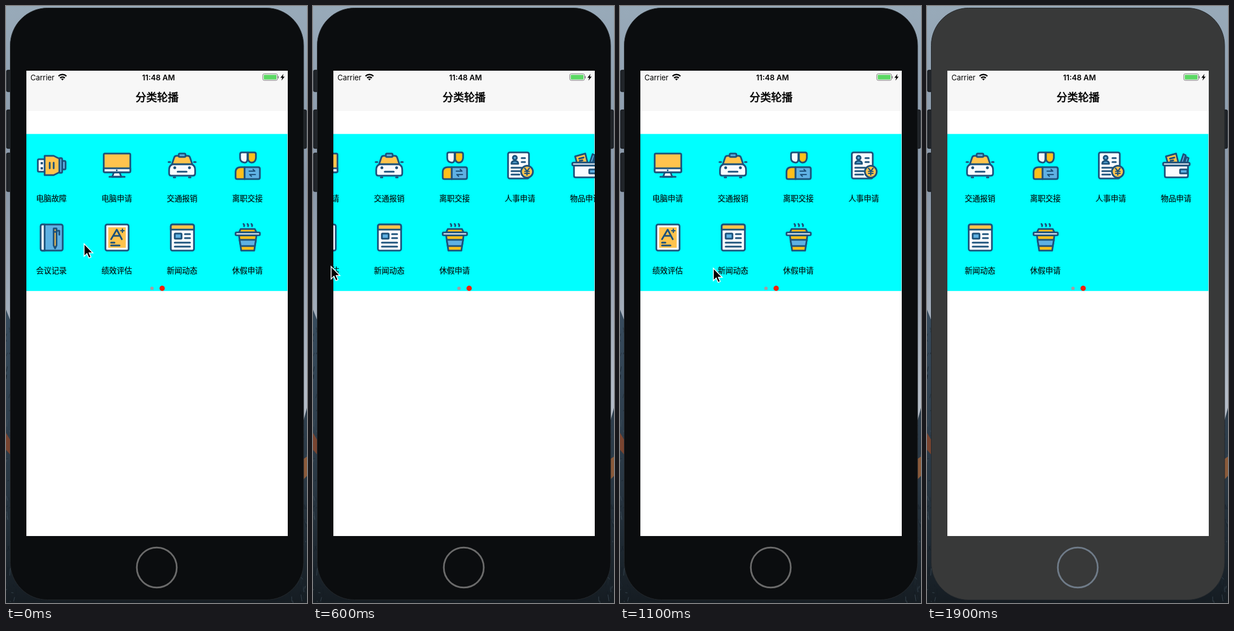
These frames come from a looping animation (532 px wide and 1052 px high, 2 s). An HTML page:

```html
<!DOCTYPE html>
<html lang="zh">
<head>
<meta charset="utf-8">
<style>
html, body { margin: 0; width: 100%; height: 100%; overflow: hidden; background: #8f9fad; }
#stage { display: block; width: 532px; height: 1052px; }
text { font-family: Inter, "Noto Sans CJK SC", "Noto Sans CJK", sans-serif; text-anchor: middle; }
.title { font-size: 19px; stroke: #000; stroke-width: .6; }
.icon { fill: none; stroke: #1c527b; stroke-width: 3; stroke-linecap: round; stroke-linejoin: round; }
.label { font-size: 13.5px; fill: #04100f; stroke: #04100f; stroke-width: .2; }
</style>
</head>
<body>
<svg id="stage" viewBox="0 0 532 1052">
  <defs>
    <linearGradient id="sky" x2="0" y2="1">
      <stop offset="0" stop-color="#98aab9"/>
      <stop offset=".3" stop-color="#8997a8"/>
      <stop offset=".65" stop-color="#b4bcc7"/>
    </linearGradient>
    <linearGradient id="rock" x2="0" y2="1">
      <stop offset="0" stop-color="#384c5e"/>
      <stop offset=".6" stop-color="#293743"/>
      <stop offset="1" stop-color="#151c22"/>
    </linearGradient>
  </defs>
  <rect width="532" height="1052" fill="url(#sky)"/>
  <path d="M0 535L8 555 200 900 526 730 532 708V1052H0z" fill="url(#rock)"/>
  <g id="texture"></g>
  <path d="M0 752l7 12v26l-7-8z" fill="#784430"/>
  <path d="M526 798l6-4v34l-6 6z" fill="#8a5a3a"/>
  <g fill="#202429" stroke="#0b0d10">
    <rect x="1" y="113" width="10" height="38" rx="2"/>
    <rect x="1" y="183" width="10" height="68" rx="2"/>
    <rect x="1" y="259" width="10" height="68" rx="2"/>
    <rect x="521" y="183" width="10" height="68" rx="2"/>
  </g>
  <rect id="body" x="7.5" y="3.5" width="518.5" height="1043" rx="66" stroke="#25292d"/>
  <circle id="home" cx="266.5" cy="989.5" r="35.3" fill="none" stroke-width="3"/>
  <rect x="36" y="114" width="462" height="820" fill="#fff"/>
  <rect x="36" y="114" width="462" height="71" fill="#f7f7f7"/>

  <text x="64.5" y="130.5" font-size="13">Carrier</text>
  <text x="269.5" y="130.5" font-size="13.3" font-weight="600">11:48 AM</text>
  <text class="title" x="267" y="168">分类轮播</text>
  <g fill="none" stroke="#000" stroke-width="2.5">
    <path d="M92.8 123.6a10.3 10.3 0 0 1 14 0M95.6 126.8a6.2 6.2 0 0 1 8.4 0"/>
    <path d="M99.8 131.3l-2.3-2.5a3.4 3.4 0 0 1 4.6 0z" fill="#000" stroke="none"/>
  </g>
  <rect x="453.8" y="119.5" width="26" height="11.5" rx="2.5" fill="#fff" stroke="#777"/>
  <rect x="455.5" y="121.2" width="22.6" height="8.2" rx="1" fill="#5bd864"/>
  <path d="M481.2 123.5v4" stroke="#777" stroke-width="1.5"/>
  <path d="M490.5 119.5l-5.5 7h3.3l-1.5 5 5.7-7h-3.3z"/>

  <rect x="36" y="225.5" width="461.3" height="276.7" fill="#0ff"/>
  <svg x="36" y="225" width="462" height="277"><g id="strip"></g></svg>
  <circle class="dot" cx="258" cy="497.5"/>
  <circle class="dot" cx="276" cy="497.5"/>
  <path id="cursor" d="M1 2V24L6 19.3 9.5 27 13.2 25.4 9.9 18H16.5z" stroke="#fff" stroke-width="1.5"/>
</svg>
<script>
const $ = id => document.getElementById(id);
const Y = '#ffc34d', B = '#5fb1e3', W = '#f8fbff', N = '#1c527b', GOLD = '#ffbf1b';
const box = (x, y, w, h, fill = 'none', r = 2) =>
  `<rect x="${x}" y="${y}" width="${w}" height="${h}" rx="${r}" fill="${fill}"/>`;
const path = (d, fill = 'none') => `<path d="${d}" fill="${fill}"/>`;
const disc = (x, y, r, fill) => `<circle cx="${x}" cy="${y}" r="${r}" fill="${fill}"/>`;
const bare = shapes => `<g stroke="none">${shapes}</g>`;
const fine = shapes => `<g stroke-width="2.2">${shapes}</g>`;

// Each icon is centred on 0,0: [column, row, label, shapes]
const items = [
  [0, 0, '打卡补签',
    box(-23, -17, 46, 38, Y, 4) + path('M-23 -8V-14Q-23 -17 -20 -17H20Q23 -17 23 -14V-8z', W) +
    box(-14.5, -22, 5, 8, B, 2.5) + box(9.5, -22, 5, 8, B, 2.5) +
    path('M-15 1h6M-3 1h6M9 1h6M-15 11h6M-3 11h6')],
  [1, 0, '待办事项',
    path('M-20 -21H20Q23 -21 23 -18V8L11 20H-20Q-23 20 -23 17V-18Q-23 -21 -20 -21z', W) +
    path('M-23 -11V-18Q-23 -21 -20 -21H20Q23 -21 23 -18V-11z', Y) +
    path('M-14 -3H14M-14 4H5M-14 11H0') + path('M11 20V12Q11 8 15 8H23z', B)],
  [2, 0, '电脑故障',
    box(-24, -11, 13, 22, W) + bare(box(-19, -6, 4, 4, N, 0) + box(-19, 3, 4, 4, N, 0)) +
    box(19, -8, 6, 15, B) + box(13, -13, 6, 26, B) +
    path('M-12 -17H4L14 -12V12L4 17H-12z', Y) + path('M-3 -5V5M4 -5V5')],
  [3, 0, '电脑申请',
    path('M-5 12L-8 20H8L5 12z', W) + box(-23, -21, 47, 33, Y, 2) +
    path('M-23 5H24V10Q24 12 22 12H-21Q-23 12 -23 10z', W) +
    path('M-13 20H14') + bare(disc(0, 8.5, 1.5, N))],
  [4, 0, '交通报销',
    path('M-18 -2L-14 -14Q-13 -17 -10 -17H10Q13 -17 14 -14L18 -2z', Y) +
    box(-6, -21, 12, 6, B) +
    path('M-17 -2H17Q23 0 23 8V14Q23 18 19 18H-19Q-23 18 -23 14V8Q-23 0 -17 -2z', W) +
    path('M-24 -6h3M21 -6h3M-8 11H8M-15 21h3M12 21h3') +
    bare(disc(-13, 4, 2.5, N) + disc(13, 4, 2.5, N))],
  [5, 0, '离职交接',
    path('M-13 -20Q-13 -23 -10 -23H0V-12Q0 -5 -5 -5Q-13 -6 -13 -13z', W) +
    path('M1 -23H12Q15 -23 15 -20V-13Q14 -5 7 -5Q2 -6 1 -11z', GOLD) +
    path('M-5 3V24H-18Q-21 24 -21 21V12Q-21 3 -12 3z', GOLD) +
    path('M-5 3H19Q22 3 22 6V21Q22 24 19 24H-5z', B) +
    fine(path('M3 10H13L10 7M14 16H4L7 19'))],
  [6, 0, '人事申请',
    box(-21, -23, 37, 46, W, 3) + disc(-9, -13.5, 3.5, B) +
    path('M-15 -3Q-15 -8 -9 -8T-3 -3z', B) +
    path('M3 -13H9M3 -6H9M-15 4H3M-15 10H0M-15 16H-1') + disc(12.5, 11, 10.5, Y) +
    fine(path('M8.5 5L12.5 10L16.5 5M12.5 10V17M8.5 10.5H16.5M8.5 14H16.5'))],
  [7, 0, '物品申请',
    path('M-18 -16L0 -21L4 -5H-15z', Y) + path('M-11 -12L-3 -14M-10 -8L-5 -9') +
    path('M8 -5L13 -20L17 -18L13 -5z', B) + path('M15 -5L18 -15L22 -13L20 -5z', B) +
    path('M-20 0H21V18Q21 21 18 21H-17Q-20 21 -20 18z', W) +
    box(-23, -5, 47, 5, W) + box(7, 7, 13, 7, B, 1)],
  [0, 1, '付款申请',
    box(9, -14, 14, 28, W, 1) + path('M14 -14V14M19 -14V14') + box(-22, -23, 31, 46, Y, 3) +
    box(-16, -16, 20, 9, B, 1) + path('M-16 2h1M-7 2h1M2 2h1M-16 9h1M-7 9h1M2 9h1M-16 16h1M-7 16h1M2 16h1')],
  [1, 1, '工牌',
    box(-19, -23, 39, 46, W, 3) + path('M-19 -17H20') + path('M-3 -12H3V-8Q0 -3 -3 -8z', B) +
    path('M-6 4V1Q-6 -2 -3 -2H3Q6 -2 6 1V4z', GOLD) + path('M-8 10H8M-12 16H12')],
  [2, 1, '会议记录',
    box(-19, -23, 39, 46, B, 3) + path('M-12 -23H-16Q-19 -23 -19 -20V20Q-19 23 -16 23H-12z', W) +
    path('M4 -16H9V14L6.5 19L4 14z', Y) + path('M4 -10H9M10 -12H14V-5')],
  [3, 1, '绩效评估',
    box(-20, -23, 41, 46, W, 3) + bare(box(-15, -18, 31, 36, Y, 0)) +
    path('M-10 3L0 -14L9 3M-6 -3H6M-10 9H-4M-10 14H5') +
    fine(path('M10 -15V-9M7 -12H13'))],
  [4, 1, '新闻动态',
    box(-20, -23, 41, 46, W, 3) + path('M-20 -14V-20Q-20 -23 -17 -23H18Q21 -23 21 -20V-14z', Y) +
    box(-13, -7, 12, 9, B, 1) + path('M5 -6H14M5 1H14M-13 9H14M-13 16H14')],
  [5, 1, '休假申请',
    path('M-7 -24Q-5 -22 -6 -20M0 -24Q2 -22 1 -20M7 -24Q9 -22 8 -20') +
    path('M-15 -9L-12 -15H13L16 -9z', GOLD) + path('M-15 -4L-11 23H12L16 -4z', GOLD) +
    path('M-14 4H15L13 15H-12z', B) + box(-21, -9, 43, 5, W, 1.5)],
];
$('strip').innerHTML = items.map(([col, row, name, shapes]) =>
  `<g transform="translate(${57.75 + 115.5 * col} ${56 + 127 * row})">
    <g class="icon">${shapes}</g><text class="label" y="62.5">${name}</text></g>`).join('');

let seed = 7;
const random = () => (seed = seed * 16807 % 2147483647) / 2147483647;
$('texture').innerHTML = Array.from({ length: 220 }, (_, i) => {
  const right = i % 2, y = (right ? 730 : 550) + random() * (right ? 320 : 500);
  const x = (right ? 500 : 0) + random() * 32;
  const tone = ['#141d25', '#43535f', '#1f2a33'][i % 3];
  return `<path d="M${x} ${y}l${random() * 8 - 4} ${random() * 14}" stroke="${tone}" opacity=".7"/>`;
}).join('');

// Swipes: [ms, scroll offset, pointer x, pointer y]
const swipes = [
  [0, 244.5, 137, 417], [100, 90, 280, 432], [200, 22, 300, 445], [300, 2, 295, 454],
  [400, -2, 284, 455], [500, 200, 90, 458], [600, 421, 31, 457], [700, 460, 220, 442],
  [800, 208, 472, 432], [900, 42, 482, 445], [1000, 150, 370, 456], [1100, 356, 164, 460],
  [1200, 440, 50, 470], [1300, 459, -40, 480], [1400, 462, -40, 480], [2000, 462, -40, 480],
];
const dots = document.querySelectorAll('.dot');

function draw(now) {
  const t = Math.floor(now % 2000 / 100) * 100;
  const k = swipes.findIndex(s => s[0] > t), a = swipes[k - 1], b = swipes[k];
  const f = (t - a[0]) / (b[0] - a[0]);
  const [, scroll, x, y] = a.map((v, i) => v + (b[i] - v) * f);
  $('strip').setAttribute('transform', `translate(${-scroll} 0)`);
  $('cursor').setAttribute('transform', `translate(${x} ${y})`);
  dots.forEach((dot, i) => {
    const active = i === (scroll > 231 ? 1 : 0);
    dot.setAttribute('r', active ? 4.7 : 3);
    dot.setAttribute('fill', active ? '#f3200b' : '#a39ca3');
  });
  const inactive = t >= 1700;
  $('body').setAttribute('fill', inactive ? '#383939' : '#0b0d0f');
  $('home').setAttribute('stroke', inactive ? '#6f7b88' : '#6a6a6a');
}
function tick() {
  draw(performance.now());
  requestAnimationFrame(tick);
}
tick();
</script>
</body>
</html>
```
